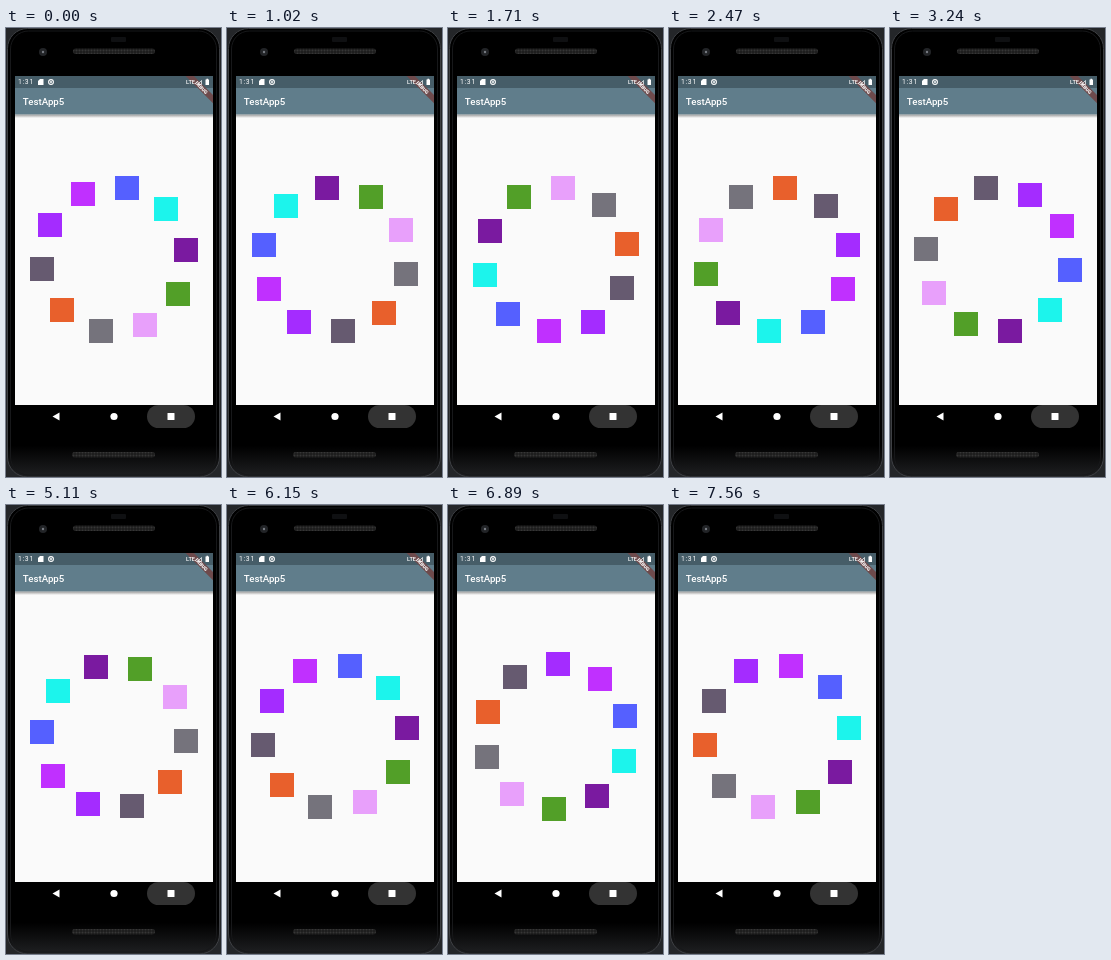
An HTML page that plays this animation: 215 by 449 pixels, repeating every 7590 ms.

```html
<!DOCTYPE html>
<html lang="en">
<head>
<meta charset="utf-8">
<title>Rotating squares</title>
<style>
  html, body { margin: 0; width: 100%; height: 100%; overflow: hidden; background: #242629; }
  svg { display: block; width: 215px; height: 449px; }
  text { font-family: Roboto, sans-serif; fill: #fff; }
</style>
</head>
<body>
<svg viewBox="0 0 215 449">
  <defs>
    <clipPath id="screen"><rect x="9" y="48" width="198" height="329"/></clipPath>
    <linearGradient id="shadow" x2="0" y2="1">
      <stop stop-color="#000" stop-opacity=".4"/>
      <stop offset="1" stop-color="#000" stop-opacity="0"/>
    </linearGradient>
    <linearGradient id="body" x2="0" y2="1">
      <stop offset=".93"/>
      <stop offset="1" stop-color="#1f2022"/>
    </linearGradient>
    <pattern id="mesh" width="3" height="3" patternUnits="userSpaceOnUse">
      <rect width="3" height="3" fill="#1c1c1c"/>
      <circle cx="1.5" cy="1.5" r="1" fill="#363636"/>
    </pattern>
  </defs>

  <!-- phone body -->
  <rect x="1.5" y=".5" width="212" height="448.5" rx="20" fill="url(#body)" stroke="#3e4044"/>
  <rect x="4.5" y="3" width="206" height="444" rx="18" fill="none" stroke="#17181a"/>
  <rect x="105" y="9" width="15" height="5" rx="1" fill="#0f1012"/>
  <circle cx="37" cy="24" r="4" fill="#222427"/>
  <circle cx="37" cy="24" r="1.2" fill="#777b82"/>
  <rect x="67" y="20.5" width="82" height="5.5" rx="2.7" fill="url(#mesh)"/>
  <rect x="66" y="424" width="83" height="5.5" rx="2.7" fill="url(#mesh)"/>

  <g clip-path="url(#screen)">
    <rect x="9" y="48" width="198" height="329" fill="#fafafa"/>
    <rect x="9" y="86.4" width="198" height="3.6" fill="url(#shadow)"/>
    <rect x="9" y="60" width="198" height="26.4" fill="#607d8b"/>
    <rect x="9" y="48" width="198" height="12" fill="#465d68"/>
    <text x="16.8" y="76.8" font-size="9.7" font-weight="500">TestApp5</text>

    <g id="ring" shape-rendering="crispEdges"></g>

    <!-- corner ribbon -->
    <g transform="translate(207 48) rotate(45)">
      <rect x="-19.3" y="13.5" width="38.6" height="5.8" fill="#6e4a4c"/>
      <text y="18.1" font-size="4.9" font-weight="900" text-anchor="middle">DEBUG</text>
    </g>

    <!-- status bar -->
    <text x="12" y="56.4" font-size="6.8" letter-spacing=".7">1:31</text>
    <path d="M32 53l2-2h3.5v6H32z" fill="#fff"/>
    <circle cx="45" cy="54" r="2.4" fill="none" stroke="#fff" stroke-width="1.1"/>
    <circle cx="45" cy="54" r="1" fill="#fff"/>
    <text x="180" y="56" font-size="5.6" font-weight="500">LTE</text>
    <path d="M191.5 56.5h4v-4z" fill="none" stroke="#fff" stroke-width=".7"/>
    <path d="M199.5 51.5h1v-.8h1.5v.8h1V57h-3.5z" fill="#fff"/>
  </g>

  <!-- navigation bar -->
  <rect x="141" y="377" width="48" height="23" rx="11.5" fill="#333"/>
  <path d="M46.5 388.5l7-4v8z" fill="#fff"/>
  <circle cx="108" cy="388.5" r="3.6" fill="#fff"/>
  <rect x="161.5" y="385" width="7" height="7" rx=".6" fill="#fff"/>
</svg>
<script>
const LOOP = 7590, SIZE = 24, RADIUS = 72.3, CX = 108, CY = 231.5;
const colors = ['#5560ff', '#1cf4ec', '#7a1aa0', '#529f28', '#e8a0fb',
                '#75737c', '#e8602c', '#665a70', '#a42cff', '#c030ff'];

// [time, hold, degrees travelled]: nearly constant speed, 360 degrees each way
const keys = [[0, 20, 79.8], [1020, 60, 168.2], [2470, 50, 299.7], [3990, 50, 439.7],
              [5110, 30, 543.2], [6150, 50, 641.6], [7560, 30, 763]];

const ring = document.getElementById('ring');
const squares = colors.map(fill => {
  const rect = document.createElementNS('http://www.w3.org/2000/svg', 'rect');
  for (const [name, value] of Object.entries({ width: SIZE, height: SIZE, fill }))
    rect.setAttribute(name, value);
  return ring.appendChild(rect);
});

function travelled(t) {
  const i = keys.findLastIndex(key => key[0] <= t);
  const [t0, hold, a] = keys[i];
  if (t < t0 + hold) return a;
  const [t1, nextHold, b] = keys[i + 1];
  const start = t0 + hold / 2, end = t1 + nextHold / 2;
  return a + (b - a) * (t - start) / (end - start);
}

// Swing counter-clockwise through a full turn, then back
function angleAt(t) {
  const s = travelled(t) % 720;
  return -Math.min(s, 720 - s);
}

function draw(now) {
  const angle = angleAt(now % LOOP);
  squares.forEach((rect, i) => {
    const a = (angle + i * 36) * Math.PI / 180;
    rect.setAttribute('x', Math.round(CX + RADIUS * Math.cos(a) - SIZE / 2));
    rect.setAttribute('y', Math.round(CY + RADIUS * Math.sin(a) - SIZE / 2));
  });
}

const began = performance.now();
function tick() {
  draw(performance.now() - began);
  requestAnimationFrame(tick);
}
tick();
</script>
</body>
</html>
```
